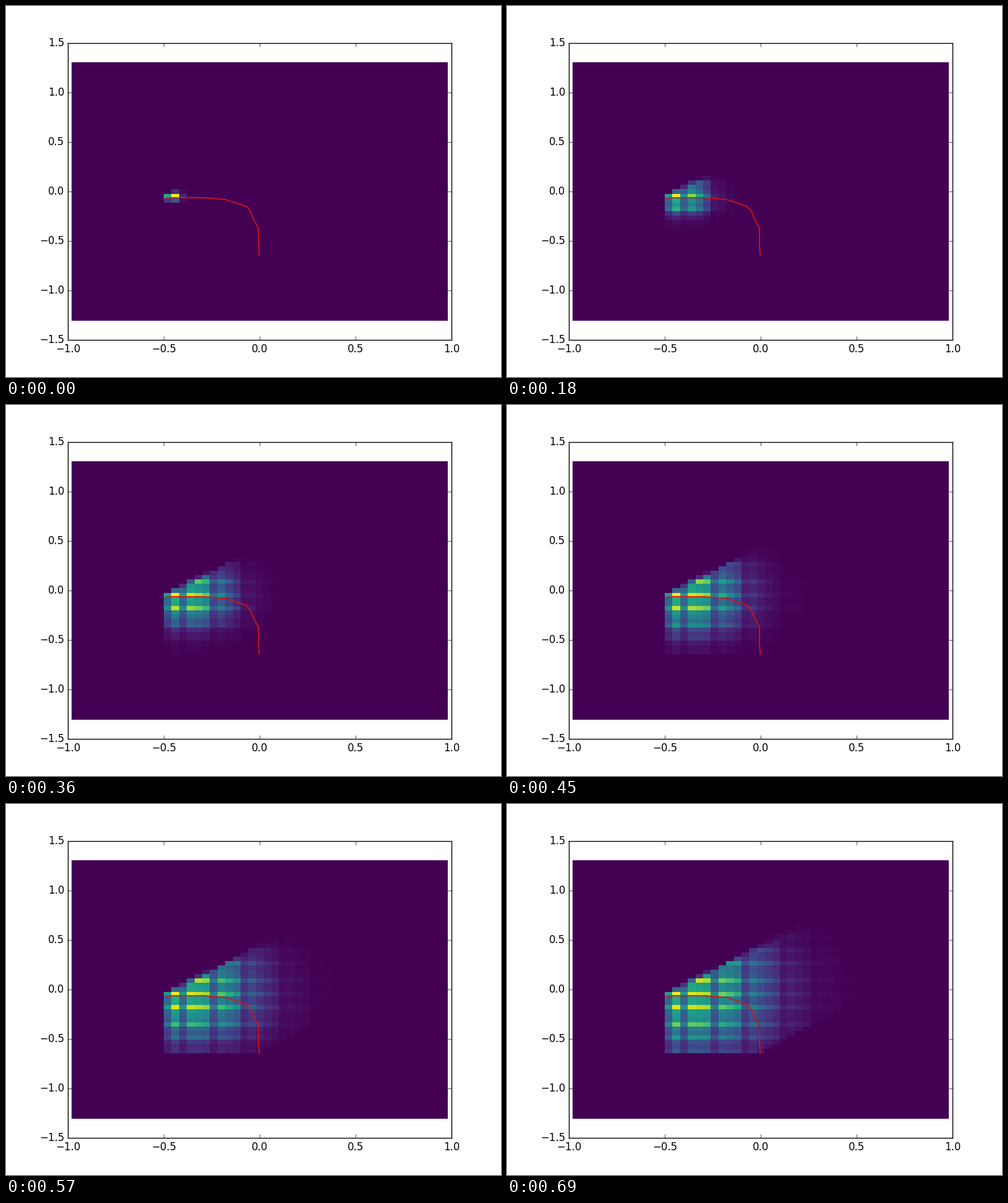
Write a matplotlib script that moves like this. It is 800 by 600 pixels and loops after 720 ms.

```python
import numpy as np
import matplotlib.pyplot as plt
from matplotlib.animation import FuncAnimation

FRAMES, INTERVAL = 24, 30
COLS, ROWS = 49, 59
HALF_W, HALF_H = 0.98, 1.306
START_COL, START_ROW, FLOOR = 12, 30, 44

plt.style.use("classic")
plt.rcParams["font.family"] = "DejaVu Sans"
plt.rcParams["savefig.facecolor"] = "white"

col = np.arange(COLS)[None, :]
row = np.arange(ROWS)[:, None]

# Cells that catch fewer lattice points stay dimmer.
col_weight = np.where(np.isin(col, [12, 14, 18, 22, 27, 31, 35]), 0.55, 1.0)
row_weight = np.where(np.isin(row % 10, [0, 3, 7]), 1.0, 0.62)

# Reachable region: a diagonal band with a left wall and a floor.
step = col - START_COL
top = START_ROW + 0.35 * np.clip(step, 0, 1) - 0.9 * step
bottom = FLOOR - 0.9 * np.maximum(col - 23.5, 0)
region = np.clip(row + 1 - top, 0, 1) * np.clip(bottom - row, 0, 1) * (step >= 0)
base = region * col_weight * row_weight


def fall(distance, width):
    """Smooth drop from 1 to 0 around distance 0."""
    return 1 / (1 + np.exp(np.clip(distance / width, -50, 50)))


def density(n):
    right = 13.6 + 0.48 * n - 0.0045 * n * n
    down = 30.9 + 0.405 * n
    up = 29.2 - 0.3 * n - 0.007 * n * n
    width = 0.27 + 0.113 * n
    d = base * fall(col - right, width)
    d = d * fall(row - down, width) * fall(up - row, width)
    return d / d.max()


fig = plt.figure(figsize=(8, 6), dpi=100, facecolor="white")
ax = fig.add_axes([0.125, 0.1, 0.775, 0.8])
heat = ax.imshow(density(0), extent=(-HALF_W, HALF_W, -HALF_H, HALF_H),
                 origin="upper", aspect="auto", interpolation="nearest",
                 cmap="viridis", vmin=0, vmax=1)

path_x = [-0.49, -0.455, -0.29, -0.175, -0.07, -0.048, -0.032, -0.006, -0.006, -0.002]
path_y = [-0.068, -0.063, -0.063, -0.082, -0.15, -0.20, -0.28, -0.372, -0.55, -0.645]
ax.plot(path_x, path_y, color="#d31418", lw=1.3)

ax.set_xlim(-1, 1)
ax.set_ylim(-1.5, 1.5)
ax.set_xticks(np.arange(-1, 1.1, 0.5))
ax.set_yticks(np.arange(-1.5, 1.6, 0.5))


def update(n):
    heat.set_data(density(n))
    return [heat]


anim = FuncAnimation(fig, update, frames=FRAMES, interval=INTERVAL,
                     repeat=True, repeat_delay=0)
plt.show()
```
